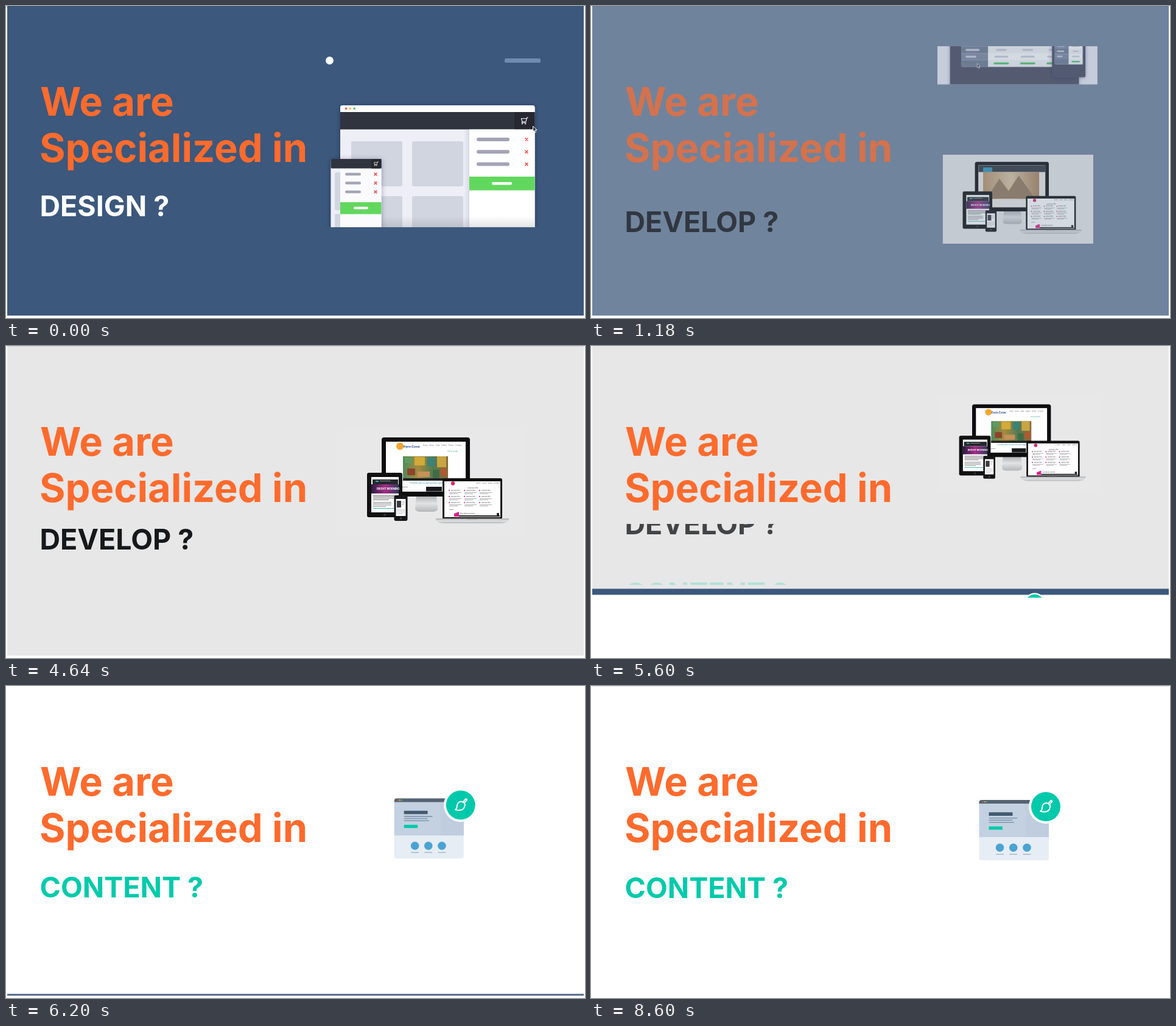
An HTML page for the animation above (8.74 s loop, 951x512 px).

```html
<!DOCTYPE html>
<html lang="en">
<head>
<meta charset="utf-8">
<title>We are specialized in</title>
<style>
  html, body { margin: 0; width: 100%; height: 100%; overflow: hidden; background: #fff; }
  svg { display: block; width: 951px; height: 512px; }
  text { font-family: Inter, "Open Sans", sans-serif; font-weight: 700; }
  .head { font-size: 65px; fill: #ff6b2d; }
  .word { font-size: 46.5px; }
</style>
</head>
<body>
<svg id="stage" viewBox="0 0 951 512"></svg>
<script>
const LOOP = 8740;
const BLUE = '#3c587c';

const rect = (x, y, w, h, fill, r = 0, extra = '') =>
  `<rect x="${x}" y="${y}" width="${w}" height="${h}" rx="${r}" fill="${fill}" ${extra}/>`;
const dot = (x, y, r, fill) => `<circle cx="${x}" cy="${y}" r="${r}" fill="${fill}"/>`;
const path = (d, fill, extra = '') => `<path d="${d}" fill="${fill}" ${extra}/>`;
const line = (d, color, width) =>
  path(d, 'none', `stroke="${color}" stroke-width="${width}" stroke-linecap="round" stroke-linejoin="round"`);
const label = (x, y, size, fill, text, weight = 400) =>
  `<text x="${x}" y="${y}" style="font-size:${size}px;font-weight:${weight}" fill="${fill}">${text}</text>`;
const each = (list, fn) => list.map(fn).join('');
const lights = (x, y, gap, r) =>
  each(['#f0524f', '#f5b83d', '#53c25a'], (c, i) => dot(x + gap * i, y, r, c));
const cross = (x, y, s) => line(`M${x - s} ${y - s}l${2 * s} ${2 * s}m0 ${-2 * s}l${-2 * s} ${2 * s}`, '#f2545b', 1.7);
const cursor = (x, y) =>
  path(`M${x} ${y}v9l2-1.7 1.6 3.2 1.7-.8-1.6-3.2h2.8z`, '#30343e', 'stroke="#fff" stroke-width="1"');
const cart = (x, y, k) =>
  `<g transform="translate(${x} ${y}) scale(${k})">` +
  line('M11 0h-2l-2 8h-7l-2-6h10M0 8l-1 2h8', '#fff', 1.3) +
  dot(0, 12, 1.2, '#fff') + dot(6, 12, 1.2, '#fff') + '</g>';

function shopScene() {
  const panel = (x, y, w, bars, barH, barW, crossX, s) =>
    each(bars, b => rect(x, b - barH / 2, barW, barH, '#a4a4b5', barH / 2) + cross(crossX, b, s));
  return dot(531.5, 89.5, 6.5, '#fff') +
    rect(819, 86, 59, 7, '#6f8bb0', 2) +
    '<g clip-path="url(#shopClip)">' +
    rect(549, 163, 319.5, 206, '#eeeef7', 4, 'filter="url(#shadow)"') +
    rect(549, 163, 319.5, 20, '#fff', 4) + lights(558.5, 168.3, 6.8, 1.8) +
    rect(549, 174, 319.5, 28.5, '#30343e') + rect(835, 174, 33.5, 28.5, '#25282f') +
    cart(848, 183, .85) +
    each([[567, 222], [667, 222], [567, 312], [667, 312]], ([x, y]) => rect(x, y, 84, 74, '#d1d5e0', 3)) +
    rect(752, 202.5, 9, 161, 'url(#edge)') +
    rect(761, 202.5, 107.5, 161, '#fff') +
    panel(773, 0, 0, [219, 239.3, 259.6], 6, 54, 855, 2) +
    rect(761, 280, 107.5, 22.5, '#62d75d') + rect(798, 289, 33, 4.5, '#fff', 2) +
    rect(549, 345, 319.5, 18, 'url(#floor)') +
    rect(533.5, 251, 83, 120, '#eeeef7', 3, 'filter="url(#shadow)"') +
    rect(540, 273, 20, 62, '#d1d5e0', 3) + rect(540, 341, 20, 30, '#d1d5e0', 3) +
    rect(549, 266, 67.5, 98, '#fbfbfd') +
    rect(533.5, 251, 83, 15.5, '#30343e', 2) + rect(600, 251, 16.5, 15.5, '#25282f') +
    cart(605.5, 255.5, .55) +
    panel(557, 0, 0, [276, 290.5, 305], 4.5, 26, 607, 1.8) +
    rect(549, 322, 67.5, 19.5, '#62d75d') + rect(571, 329.5, 24, 4, '#fff', 2) +
    '</g>' + cursor(865.5, 197);
}

function tableScene() {
  const grid = (x, y, leftW, w, rowH, barH, lefts, cols, cells, headW) => {
    let out = rect(x, y, w, rowH * 6, '#fff', 2);
    for (let i = 0; i < 6; i++) {
      const top = y + i * rowH, bar = top + (rowH - barH) / 2;
      out += rect(x, top, leftW, rowH + .1, i % 2 ? '#6b7991' : '#7e87a2');
      if (i % 2) out += rect(x + leftW, top, w - leftW, rowH, '#f4f4f8');
      if (lefts[i]) out += rect(x + leftW * .15, bar, lefts[i], barH, '#cfd3df', barH / 2);
      const bw = i % 5 ? cells[i % 2] : headW;
      const color = i === 0 ? '#7f7990' : i === 5 ? '#43c25f' : '#cacbdc';
      out += each(cols, c => rect(c - bw / 2, bar, bw, barH, color, barH / 2));
    }
    return out;
  };
  return rect(528, 14, 345, 259.3, '#ebecf7') +
    '<g clip-path="url(#tableClip)">' +
    rect(555, 100, 278, 190, '#484c61', 3, 'filter="url(#shadow)"') + lights(562.5, 105, 5.9, 1.5) +
    grid(580, 148, 57, 240, 14.55, 4, [34, 23, 30, 30, 23], [665.5, 722.5, 779.5], [30, 23], 33) +
    rect(775, 135, 72, 123, '#454960', 3, 'filter="url(#shadow)"') +
    grid(781, 163, 30, 60, 11.15, 3, [18, 12, 16, 16, 12], [826], [17, 13], 18) +
    '</g>' + cursor(613.5, 228);
}

function deviceScene() {
  const lines = (x, y, w, n, gap, color) =>
    each([...Array(n).keys()], i => rect(x, y + i * gap, w * (i === n - 1 ? .7 : 1), .8, color));
  const services = each([0, 1, 2], c => each([0, 1, 2], r => {
    const x = 728 + c * 25, y = 237 + r * 10;
    return dot(x, y, 1.1, '#e0218a') + label(x + 3, y + .8, 2.6, '#444', 'Service title') +
      lines(x, y + 3, 20, 2, 2, '#999');
  }));
  return rect(554, 136, 294, 174, '#e8e8e8') +
    // monitor
    path('M674 245h33l2 22q0 5-9 5h-19q-9 0-9-5z', 'url(#metal)') +
    rect(617, 150, 145, 97, '#0d0d0f', 4) + rect(624, 157, 131, 82, '#fff') +
    dot(647, 164.5, 6, '#f2a72e') + label(653, 167, 5.4, '#27478f', 'Fern Cove', 700) +
    label(685, 164, 2.8, '#777', 'Home &#160; About &#160; Team &#160; Gallery &#160; Events &#160; Contact') +
    label(725, 174, 3, '#2a9d8f', 'Get in touch') +
    rect(652, 181, 74, 40, 'url(#room)') +
    each([[655, 183, 12, 9, '#5e9b62'], [671, 182, 17, 14, '#d1aa38'], [692, 183, 12, 14, '#3b8277'],
      [708, 181, 15, 18, '#c9a544'], [659, 201, 13, 11, '#8c442d'], [676, 206, 20, 9, '#c39258'],
      [701, 203, 11, 14, '#406c45'], [714, 201, 9, 12, '#b7562f']],
      ([x, y, w, h, c]) => rect(x, y, w, h, c, 1)) +
    rect(652, 217, 74, 4, '#222') +
    label(663, 226, 2.9, '#2a8fa0', 'A friendly place to learn and play together') +
    lines(650, 231, 14, 1, 2, '#888') + rect(690, 231, 26, 7.5, '#17191b') +
    '<g id="firstPage">' + rect(624, 157, 131, 82, '#eceae6') +
    rect(624, 157, 131, 13, '#30363d') + rect(633, 161, 18, 9, '#2f93b5') +
    rect(633, 170, 110, 53, 'url(#tan)') +
    path('M640 222l25-39 18 24 20-30 32 45z', '#94795b') + '</g>' +
    // tablet
    rect(593, 208, 58, 73, '#111', 3) + rect(600, 215, 45, 58, '#fff') +
    rect(602, 219, 42, 8, '#24282d') + rect(607, 221, 5, 2, '#2fb6a4') + lines(614, 221, 25, 1, 2, '#aaa') +
    rect(600, 227, 45, 15, 'url(#banner)') + label(609, 236, 4.2, '#fff', 'BRIGHT MORNING', 700) +
    lines(603, 245, 37, 4, 2.3, '#555') + lines(603, 256, 30, 4, 2.3, '#777') +
    rect(603, 266, 34, 1, '#2fb6a4') + dot(622, 277, 2, '#333') +
    // laptop
    rect(717, 217, 98, 68, '#111', 3) + rect(720, 222, 92, 59, '#fff') +
    dot(734, 225.5, 3.2, '#d82a6c') +
    label(772, 226, 2.7, '#666', 'Home &#160; About &#160; Work &#160; Contact') +
    label(758, 234, 2.7, '#555', 'What we offer') + services +
    lines(728, 268, 10, 1, 2, '#888') + path('M736 275l8-3v8h-8z', '#e0218a') +
    label(746, 276, 3, '#555', 'Our latest stories') +
    rect(744, 278, 67, 2, '#1c1c1e') + rect(806, 274, 4, 4, '#222', 1) +
    path('M706 283h120v3q-4 5-15 5h-90q-11 0-15-5z', 'url(#metal)') + rect(757, 283, 18, 2, '#aaa', 1) +
    // phone
    rect(637.5, 245, 22, 42, '#151517', 3) + rect(640.5, 251, 16, 28, '#fff') +
    rect(642, 254, 7, 11, '#3a3a3f') + lines(650, 255, 5, 3, 2.5, '#aaa') +
    lines(642, 268, 13, 4, 2.3, '#bbb') + dot(648.5, 283, 1.7, '#444');
}

function contentScene() {
  const bar = (x, y, w, h, c) => rect(x, y, w, h, c, .6);
  return rect(637.5, 187, 114.5, 99, '#e6edf4', 4) +
    path('M637.5 248v-57q0-4 4-4h106.500q4 0 4 4v57z', '#c3d1e1') +
    path('M714 193h38v55h-38z', '#bfcddf') +
    path('M637.5 193v-2q0-4 4-4h106.500q4 0 4 4v2z', '#566472') + lights(643.5, 190, 3, 1.1) +
    bar(653.5, 207.3, 39, 5.7, '#435a70') +
    each([[216, 47], [219.500, 39], [223, 41.500]], ([y, w]) => bar(653.5, y, w, 1.6, '#7f98ae')) +
    bar(653.5, 230.5, 22.5, 5.3, '#00c9ab') +
    each([671.5, 693.7, 716], x => dot(x, 265.3, 6.8, '#4ba3d3') + bar(x - 6.5, 275.4, 13, 1.7, '#a5b9c9')) +
    dot(747, 198, 28, '#fff') + dot(747, 198, 24, '#00c9ab') +
    line('M738 205.500q3-1.500 3-6 .5-7 7-7.500 7 .5 6 7-1.500 7-8 7.500-4 .3-8-1z', '#fff', 2) +
    line('M752.500 193l3.500-3.800', '#fff', 4.5) + line('M753 192.500l2.500-2.700', '#00c9ab', 1);
}

const gradient = (id, dir, ...stops) =>
  `<linearGradient id="${id}" ${dir}>` +
  each(stops, ([c, o = 1], i) =>
    `<stop offset="${i / (stops.length - 1)}" stop-color="${c}" stop-opacity="${o}"/>`) + '</linearGradient>';
const clip = (id, x, y, w, h) => `<clipPath id="${id}">${rect(x, y, w, h, '#000')}</clipPath>`;
const DOWN = 'x2="0" y2="1"';

document.getElementById('stage').innerHTML = `<defs>
  ${clip('frame', 2, 0, 947, 508)}${clip('pictures', 500, 66, 402, 347)}${clip('words', 40, 292, 420, 100)}
  ${clip('shopClip', 500, 150, 400, 213)}${clip('tableClip', 528, 14, 345, 259.3)}
  <filter id="shadow" x="-20%" y="-20%" width="140%" height="140%">
    <feDropShadow dx="0" dy="1" stdDeviation="4" flood-color="#1b2440" flood-opacity=".35"/></filter>
  ${gradient('edge', '', ['#8890b0', 0], ['#8890b0', .22])}
  ${gradient('floor', DOWN, ['#50505a', 0], ['#50505a', .16])}
  ${gradient('metal', DOWN, ['#a9abad'], ['#e2e3e4'], ['#b5b7b9'])}
  ${gradient('room', '', ['#4e8a5b'], ['#a78a3d'], ['#527b54'], ['#8c6a36'])}
  ${gradient('tan', '', ['#b89468'], ['#dac5a0'], ['#a98259'])}
  ${gradient('banner', '', ['#2a1d3f'], ['#a52c86'], ['#34375e'])}
  </defs>
  <g clip-path="url(#frame)">
    ${rect(0, 0, 951, 512, BLUE)}
    <g id="grayPage">${rect(0, 0, 951, 511, '#e7e7e7', 0, 'id="grayFill"')}${rect(0, 0, 951, 1, '#d0d0d4')}</g>
    <g id="whitePage">${rect(0, 0, 951, 511, '#fff')}${rect(0, 0, 951, 1, '#e2e2e2')}${rect(0, 510, 951, 1, '#b8b8b8')}</g>
    <g id="content">
      <text class="head" x="56" y="180">We are</text>
      <text class="head" x="55" y="256">Specialized in</text>
      <g clip-path="url(#words)">
        <text class="word" id="design" x="55.500" fill="#fff">DESIGN ?</text>
        <text class="word" id="develop" x="55.500" fill="#17181a">DEVELOP ?</text>
        <text class="word" id="copy" x="55.500" fill="#00caab">CONTENT ?</text>
      </g>
      <g clip-path="url(#pictures)">
        <g id="designPic"><g id="shop">${shopScene()}</g>
          <g id="table" transform="translate(700.5 214.5) scale(1.149) translate(-700.5 -143.5)">${tableScene()}</g></g>
        <g id="developPic">${deviceScene()}</g>
        <g id="copyPic">${contentScene()}</g>
      </g>
    </g>
  </g>`;

const el = {};
document.querySelectorAll('[id]').forEach(n => el[n.id] = n);
const set = (id, name, value) => el[id].setAttribute(name, value);
const show = (id, on) => set(id, 'display', on ? 'inline' : 'none');

// Damped spring from 0 to 1, with a slight overshoot.
function spring(ms) {
  if (ms <= 0) return 0;
  const s = 5.06 * ms / 1000, z = .75, d = Math.sqrt(1 - z * z);
  return 1 - Math.exp(-z * s) * (Math.cos(d * s) + z / d * Math.sin(d * s));
}

// Position of a carousel slide: 0 is centred, 1 waits below, -1 is above.
function slide(id, cy, pos, travel) {
  const k = 1 - Math.abs(pos) / 2;
  set(id, 'transform', `translate(700.5 ${cy + pos * travel}) scale(${k}) translate(-700.5 ${-cy})`);
}

function draw(time) {
  const t = Math.floor(time % LOOP / 20) * 20;
  const held = t < 4640;
  const p = !held ? 1 : t < 820 ? 0 : spring(Math.min(t, 1500) - 800);
  const q = spring(t - 5440);
  const fade = Math.min(1, Math.max(0, (t - 820) / 680)) ** 1.85;

  set('grayPage', 'opacity', fade);
  set('grayFill', 'fill', held ? '#e4e4e4' : '#e7e7e7');
  set('grayPage', 'transform', `translate(0 ${-521 * q})`);
  set('whitePage', 'transform', `translate(0 ${521 * (1 - q)})`);
  set('content', 'opacity', held ? 1 - .957 * fade : 1);

  set('design', 'y', 345 - 115 * p);
  set('develop', 'y', 334 + 115 * (1 - p - q));
  set('develop', 'opacity', Math.max(0, 1 - q));
  set('copy', 'y', 348 + 95 * (1 - q));
  set('copy', 'opacity', Math.min(1, q));

  show('shop', t < 820);
  show('table', t >= 820);
  show('designPic', held);
  show('developPic', t >= 820 && q < .9);
  show('firstPage', held);
  show('copyPic', q > 0);
  slide('designPic', 214.5, -p, 274);
  slide('developPic', 223, 1 - p - q, 288);
  slide('copyPic', 236, 1 - q, 267);
}

const start = performance.now();
function tick() {
  draw(performance.now() - start);
  requestAnimationFrame(tick);
}
tick();
</script>
</body>
</html>
```
